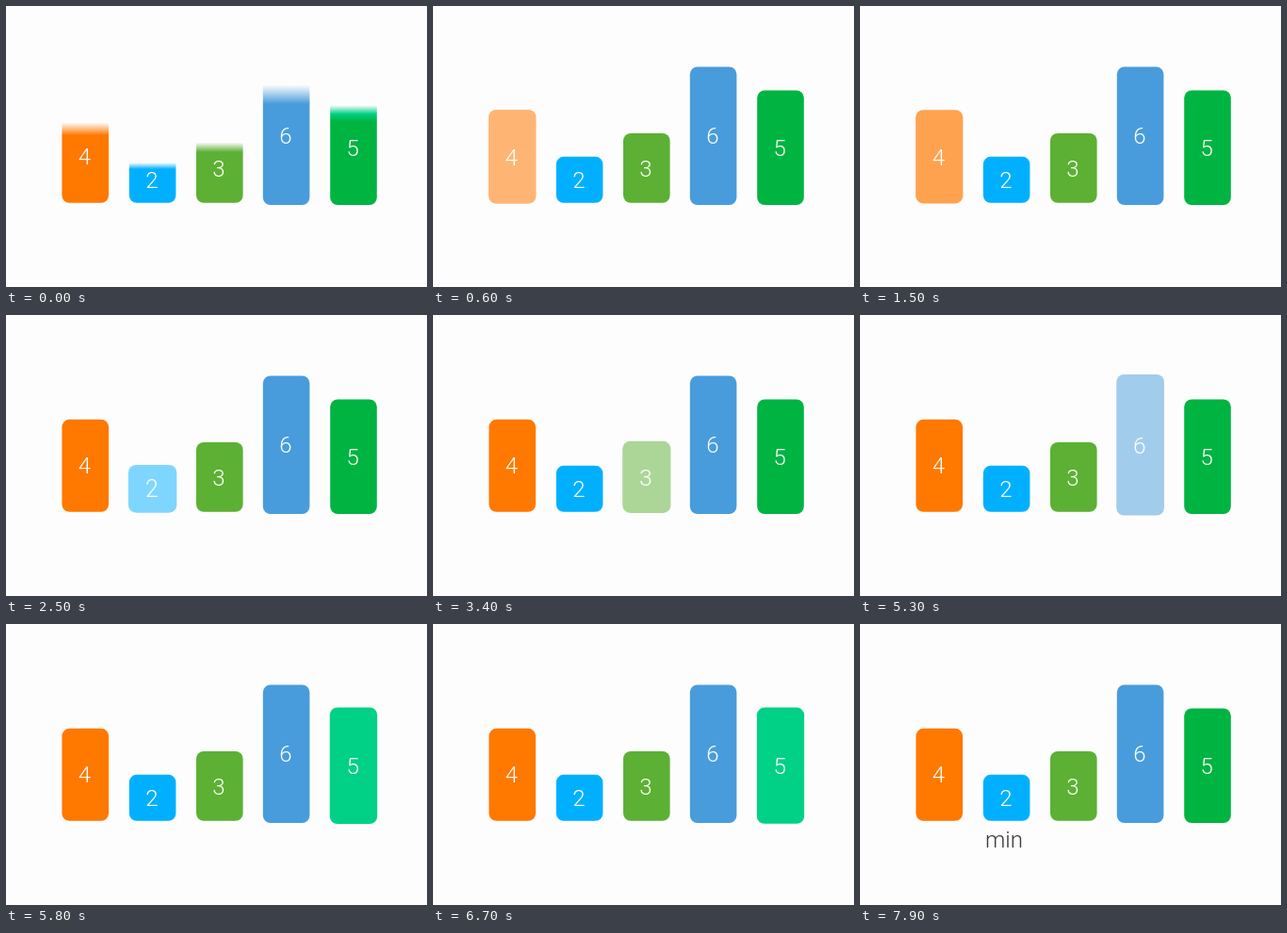
An HTML page with a canvas that plays this animation: 447 by 298 pixels, repeating every 8 s.

```html
<!DOCTYPE html>
<html lang="en">
<head>
<meta charset="utf-8">
<title>Finding the minimum</title>
<style>
  html, body { margin: 0; width: 100%; height: 100%; overflow: hidden; background: #fdfdfd; }
  canvas { display: block; }
</style>
</head>
<body>
<canvas id="stage" width="447" height="298"></canvas>
<script>
const ctx = document.getElementById('stage').getContext('2d');
const LOOP = 8000, STEP = 100;
const BACKGROUND = '#fdfdfd';
const EFFECT = 1305;        // length of one pulse or fade
const FIRST_PULSE = 360;
const SOFT_EDGE = 0.14;     // wipe edge, as a share of bar height
const FONT = '300 24px Roboto, "Open Sans", sans-serif';

// Bars in the order they are visited.
const bars = [
  { value: 4, x: 59.4, top: 110.8, bottom: 208.8, color: '#ff7800' },
  { value: 2, x: 130.8, top: 159.8, bottom: 208.8, color: '#00b0ff' },
  { value: 3, x: 202, top: 135, bottom: 208.8, color: '#5cb033' },
  { value: 6, x: 272.8, top: 64.5, bottom: 211, color: '#489cdc' },
  { value: 5, x: 344.2, top: 89.4, bottom: 211, color: '#00b441', tint: '#00d186' }
];
const BAR_WIDTH = 49.6, RADIUS = 8;

const clamp = v => Math.min(1, Math.max(0, v));

// Fades to half over the first fifth, holds, and returns over the last fifth.
const pulseFade = p => 0.5 * clamp(Math.min(p, 1 - p) / 0.2);
const pulseScale = p => 1 + 0.05 * (1 - Math.abs(2 * p - 1));

function wipeFill(bar, time) {
  const edge = 0.87 + time * (1 + SOFT_EDGE) / 1300;
  if (edge >= 1 + SOFT_EDGE) return bar.color;
  const height = bar.bottom - bar.top;
  const fill = ctx.createLinearGradient(
    0, bar.bottom - height * (edge - SOFT_EDGE),
    0, bar.bottom - height * edge);
  fill.addColorStop(0, bar.color);
  if (bar.tint) fill.addColorStop(0.45, bar.tint);
  fill.addColorStop(1, BACKGROUND);
  return fill;
}

function drawBar(bar, index, time) {
  const progress = clamp((time - FIRST_PULSE - index * EFFECT) / EFFECT);
  const fade = pulseFade(progress), scale = pulseScale(progress);
  const height = bar.bottom - bar.top;
  const cx = bar.x + BAR_WIDTH / 2, cy = bar.top + height / 2;

  ctx.save();
  ctx.translate(cx, cy);
  ctx.scale(scale, scale);
  ctx.translate(-cx, -cy);
  ctx.beginPath();
  ctx.roundRect(bar.x, bar.top, BAR_WIDTH, height, RADIUS);
  if (bar.tint && fade > 0.18) {
    ctx.fillStyle = bar.tint;
  } else {
    ctx.globalAlpha = 1 - fade;
    ctx.fillStyle = wipeFill(bar, time);
  }
  ctx.fill();
  ctx.globalAlpha = 1;
  ctx.fillStyle = '#fff';
  ctx.fillText(bar.value, cx - 0.8, cy + 8.6);
  ctx.restore();
}

function render(time) {
  ctx.fillStyle = BACKGROUND;
  ctx.fillRect(0, 0, 447, 298);
  ctx.font = FONT;
  ctx.textAlign = 'center';
  bars.forEach((bar, i) => drawBar(bar, i, time));

  const labelStart = FIRST_PULSE + bars.length * EFFECT;
  ctx.globalAlpha = clamp((time - labelStart) / EFFECT);
  ctx.fillStyle = '#000';
  ctx.fillText('min', 153, 237);
  ctx.globalAlpha = 1;
}

const start = performance.now();
function tick() {
  const elapsed = (performance.now() - start) % LOOP;
  render(Math.floor(elapsed / STEP) * STEP);
  requestAnimationFrame(tick);
}
tick();
</script>
</body>
</html>
```
